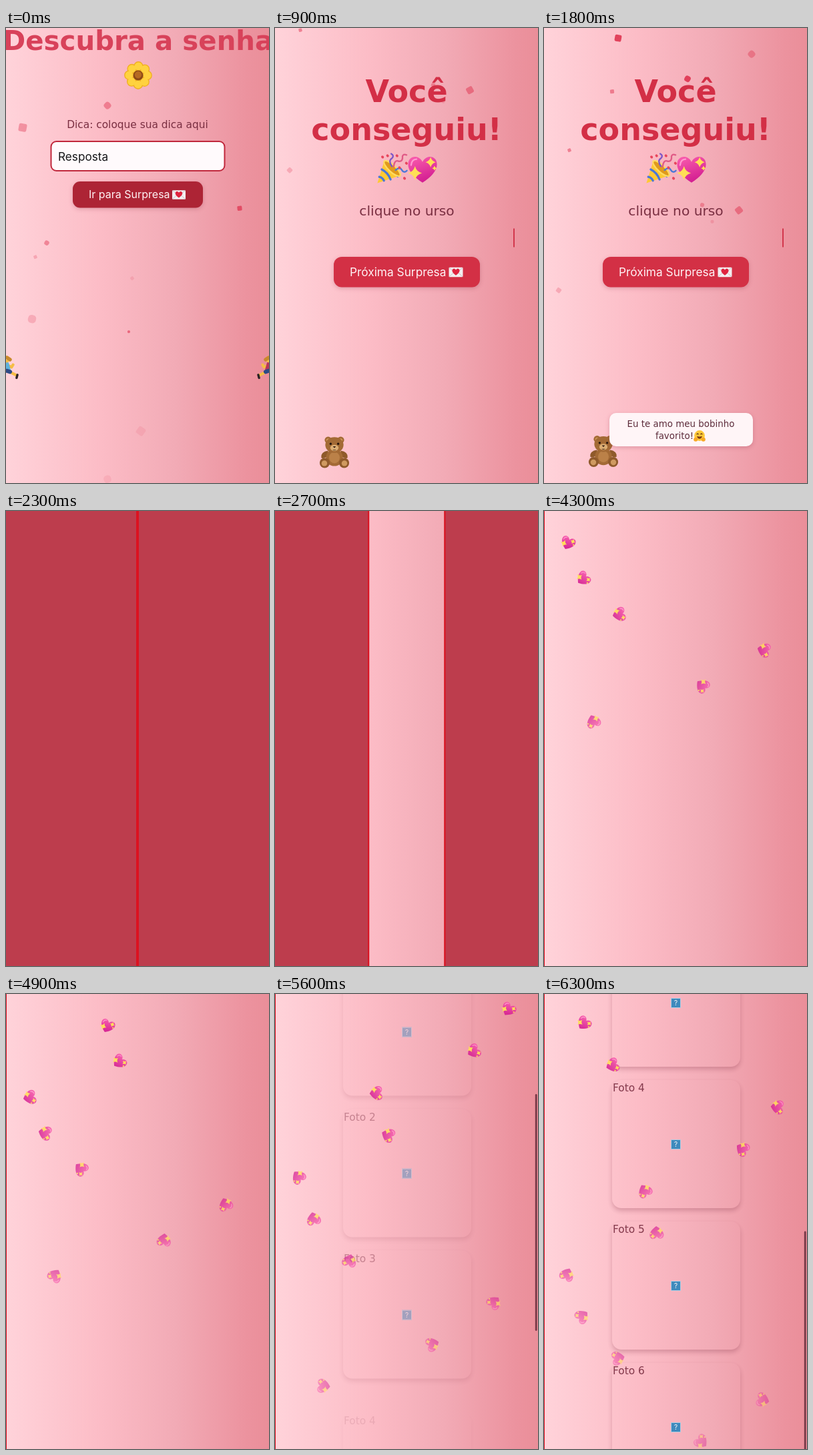
Write an HTML page that moves like this. It is 394x682 px and loops after 6400 ms.

```html
<!DOCTYPE html>
<html lang="pt">
<head>
<meta charset="utf-8">
<style>
html, body { margin: 0; width: 100%; height: 100%; overflow: hidden; }
body {
  position: relative; width: 394px; height: 682px; color: #7a2f42;
  font: 15.4px "DejaVu Sans", Verdana, sans-serif;
  background: linear-gradient(90deg, #ffd3da, #fcbcc6 36%, #f2abb6 64%, #ec939f 91%, #ea8e99);
}
svg { position: absolute; left: 0; top: 0; }
text { text-anchor: middle; fill: #7a2f42; }
.title { font-weight: bold; fill: #d32f46; }
.ui { font-family: Inter, Roboto, sans-serif; fill: #fff3f5; text-anchor: start; }
.soft { filter: drop-shadow(0 2px 3px rgba(120, 20, 40, .22)); }
.card {
  position: absolute; left: 102px; top: 0; width: 192px; height: 192px; border-radius: 14px;
  box-shadow: 0 4px 7px rgba(110, 30, 50, .27);
}
.card span { position: absolute; left: 1px; top: 3px; }
.card b {
  position: absolute; left: 88px; top: 89px; width: 13px; height: 13px; border: 1px solid #a9cfe6;
  background: #2f87bd; color: #fff; font: 10px/13px Inter, sans-serif; text-align: center;
}
</style>
</head>
<body>
<div id="photos"></div>
<svg id="stage" width="394" height="682" viewBox="0 0 394 682">
  <defs>
    <linearGradient id="pink" x1="0" y1="0" x2=".4" y2="1">
      <stop offset="0" stop-color="#fb5fae"/><stop offset="1" stop-color="#d41f92"/>
    </linearGradient>
    <path id="star" fill="#ffdf55" d="M0-20Q4-4 20 0Q4 4 0 20Q-4 4-20 0Q-4-4 0-20"/>
    <path id="love" d="M0 44C-28 26-48 5-48-16C-48-48-12-50 0-25C12-50 48-48 48-16C48 5 28 26 0 44"/>
    <g id="heart">
      <use href="#love" fill="url(#pink)"/>
      <path d="M-38-14Q-36-34-20-34" fill="none" stroke="#ff9ad0" stroke-width="5" stroke-linecap="round"/>
      <use href="#star" transform="translate(-25 12) scale(1.15)"/>
      <use href="#star" transform="translate(27 -24) scale(.85)"/>
      <use href="#star" transform="translate(40 -4) scale(.4)"/>
    </g>
    <g id="flower">
      <circle r="31" fill="#eda920" stroke="#f0ae22" stroke-width="33" stroke-linecap="round" stroke-dasharray="0 24.35"/>
      <circle r="31" fill="none" stroke="#ffd23f" stroke-width="27" stroke-linecap="round" stroke-dasharray="0 24.35"/>
      <circle r="17" fill="#8c4a17"/><circle r="12" cy="-2" fill="#b56a22"/>
    </g>
    <g id="letter">
      <rect x="-50" y="-34" width="100" height="68" rx="6" fill="#f4eef0"/>
      <path d="M-48 32L-12 0M48 32L12 0M-48-32L0 8L48-32" fill="none" stroke="#c5b9c0" stroke-width="4"/>
      <use href="#love" fill="#e0243f" transform="translate(0 -2) scale(.55)"/>
    </g>
    <g id="party" fill="none" stroke-width="5" stroke-linecap="round">
      <path d="M-46 46L-24-24Q4-14 26 22Z" fill="#ffc933"/>
      <path d="M-32 2Q-12 12-4 34M-40 26Q-30 28-25 38M-22-16Q8-4 19 24" stroke="#4a78d8" stroke-width="7"/>
      <ellipse rx="34" ry="11" transform="translate(1 -1) rotate(43)" fill="#e09a1c" stroke="#ffdb62"/>
      <path d="M0-8Q-12-26 0-33Q9-42-2-48" stroke="#7d58c8"/>
      <path d="M6-6Q8-30 22-24Q36-22 34-40Q36-48 47-44" stroke="#e05a86"/>
      <path d="M12 4Q26-8 32 4Q38 15 48 6" stroke="#4a78d8"/>
      <path d="M-30-38l1 1M-14-42l1 1M16-42l1 1M46-18l1 1M40 30l1 1M24-4l1 1" stroke="#e8455c" stroke-width="8"/>
    </g>
    <g id="bear" fill="#a36a35">
      <circle cx="-20" cy="-38" r="11"/><circle cx="20" cy="-38" r="11"/>
      <g fill="#d19a5c"><circle cx="-20" cy="-37" r="6"/><circle cx="20" cy="-37" r="6"/></g>
      <path d="M-20-4Q-44 0-42 18Q-38 24-20 14M20-4Q44 0 42 18Q38 24 20 14" fill="#8f5a2b"/>
      <ellipse cy="18" rx="27" ry="27"/><ellipse cy="18" rx="17" ry="18" fill="#bb8148"/>
      <ellipse cy="-22" rx="29" ry="25"/>
      <ellipse cy="-13" rx="13" ry="10" fill="#dcae74"/>
      <path d="M-5-18H5L0-12ZM-6-7Q0-3 6-7" fill="#3a2114"/>
      <g fill="#24140c"><circle cx="-12" cy="-26" r="3.5"/><circle cx="12" cy="-26" r="3.5"/></g>
      <circle cx="-31" cy="35" r="16" fill="#8f5a2b"/><circle cx="31" cy="35" r="16" fill="#8f5a2b"/>
      <circle cx="-32" cy="36" r="9" fill="#cf9a60"/><circle cx="32" cy="36" r="9" fill="#cf9a60"/>
    </g>
    <g id="hug">
      <circle r="44" fill="#ffc83a"/>
      <path d="M-22 4Q0 12 22 4Q16 26 0 26Q-16 26-22 4" fill="#7a3a14"/>
      <path d="M-24-10q8-12 16 0M8-10q8-12 16 0" fill="none" stroke="#5c3010" stroke-width="6"/>
      <g fill="#f7a825"><circle cx="-32" cy="32" r="17"/><circle cx="32" cy="32" r="17"/></g>
    </g>
    <g id="runner" fill="none" stroke="#f5bd45" stroke-width="11" stroke-linecap="round" stroke-linejoin="round">
      <path d="M4 10L-18 18L-12 42M6 10L26 20L42 28M2-14L22-4L28-14"/>
      <path d="M0-16L6 6" stroke="currentColor" stroke-width="24"/>
      <path d="M4 10L16 14" stroke="#2c4a86" stroke-width="16"/>
      <circle cx="2" cy="-36" r="8"/><path d="M4-42L16-34" stroke="#c98a2c" stroke-width="14"/>
      <path d="M45 26L42 38M-14 44L-24 44" stroke="#2a2024" stroke-width="9"/>
    </g>
  </defs>

  <g id="password">
    <g id="confettiA"></g>
    <text class="title" x="198" y="33" font-size="40.3" style="fill:#d8425a">Descubra a senha</text>
    <use href="#flower" transform="translate(198 71) scale(.44)"/>
    <text x="197" y="150">Dica: coloque sua dica aqui</text>
    <rect x="67.5" y="170" width="260" height="44" rx="8" fill="#fffafc" stroke="#c0283c" stroke-width="2"/>
    <text class="ui" x="78" y="199" font-size="17.2" style="fill:#17171a">Resposta</text>
    <rect class="soft" x="100" y="230" width="195" height="39.5" rx="11" fill="#ad2435"/>
    <text class="ui" x="124" y="255" font-size="16">Ir para Surpresa</text>
    <use href="#letter" transform="translate(259 250) scale(.2)"/>
    <use id="runLeft" href="#runner" color="#5db2dc"/>
    <use id="runRight" href="#runner" color="#b8365a"/>
  </g>

  <g id="success">
    <g id="confettiB"></g>
    <text class="title" font-size="46"><tspan x="197" y="111">Você</tspan><tspan x="197" y="168">conseguiu!</tspan></text>
    <use href="#party" transform="translate(175 211) scale(.47)"/>
    <use href="#heart" transform="translate(221 212) scale(.45)"/>
    <text x="197.5" y="281" font-size="20.2">clique no urso</text>
    <path id="caret" d="M358 300.5V328.5" stroke="#d2364c" stroke-width="2"/>
    <rect class="soft" x="88" y="343" width="219" height="45.5" rx="12" fill="#d33045"/>
    <text class="ui" x="112" y="372" font-size="17.3">Próxima Surpresa</text>
    <use href="#letter" transform="translate(271 366) scale(.21)"/>
    <use id="teddy" href="#bear"/>
    <g id="bubble">
      <rect class="soft" x="98" y="577" width="215" height="50" rx="10" fill="#fff5f7"/>
      <text font-size="13.4" style="fill:#5c2b3a"><tspan x="205" y="598">Eu te amo meu bobinho</tspan><tspan x="195.5" y="616">favorito!</tspan></text>
      <use href="#hug" transform="translate(233 611) scale(.18)"/>
    </g>
  </g>

  <g id="surprise">
    <g id="rain"></g>
    <g id="curtainL"><rect x="-200" width="200" height="682" fill="#bd3d4d"/><rect x="-2" width="2" height="682" fill="#dc1220"/></g>
    <g id="curtainR"><rect width="200" height="682" fill="#bd3d4d"/><rect width="2" height="682" fill="#dc1220"/></g>
    <rect id="thumb" x="389.8" width="2.8" height="355" rx="1.4" fill="#5a2433" opacity=".8"/>
  </g>
</svg>
<script>
const LOOP = 6400, SUCCESS = 400, CURTAIN = 2200, OPEN = 2310, SCROLL = 5300;
const $ = id => document.getElementById(id);
const clamp = v => Math.max(0, Math.min(1, v));
const mix = (a, b, k) => a + (b - a) * k;

// CSS "ease" timing curve
function ease(u) {
  if (u <= 0 || u >= 1) return clamp(u);
  let lo = 0, hi = 1, s;
  for (let i = 0; i < 20; i++) {
    s = (lo + hi) / 2;
    if (.75 * s * (1 - s) + s ** 3 < u) lo = s; else hi = s;
  }
  return .3 * s * (1 - s) ** 2 + 3 * s * s * (1 - s) + s ** 3;
}

function add(parent, tag, attrs) {
  const el = document.createElementNS("http://www.w3.org/2000/svg", tag);
  for (const name in attrs) el.setAttribute(name, attrs[name]);
  return parent.appendChild(el);
}

function place(el, x, y, scale = 1, turn = 0) {
  el.setAttribute("transform", `translate(${x} ${y}) rotate(${turn}) scale(${scale})`);
}

// Each piece: x, y at the given time, size, opacity
function confetti(parent, time, pieces) {
  const items = pieces.map(([x, y, size, opacity], i) => ({
    x, y, i,
    el: add(parent, "rect", { x: -size / 2, y: -size / 2, width: size, height: size,
      rx: size * (i % 2 ? .4 : .22), fill: "#df3450", opacity })
  }));
  return t => items.forEach(({ el, x, y, i }) =>
    place(el, x, y + (t - time) * .2, 1, 10 + i * 37 + (t - time) * .09));
}

const fallA = confetti($("confettiA"), 0, [
  [25, 149, 12, .4], [152, 116, 10, .45], [350, 270, 7, .75], [61, 322, 7, .45], [44, 343, 5, .25],
  [39, 436, 12, .22], [189, 375, 5, .14], [184, 455, 4, .6], [202, 604, 12, .1], [152, 676, 11, .1]
]);
const fallB = confetti($("confettiB"), 1800, [
  [111, 15, 10, .9], [311, 39, 10, .4], [102, 95, 6, .5], [215, 76, 9, .9], [38, 183, 5, .5],
  [237, 265, 6, .4], [292, 273, 10, .5], [252, 290, 5, .2], [22, 393, 7, .25], [180, -40, 8, .7]
]);

const hearts = [75, 238, 330, 113, 59, 36, 170, 152, 298, 350, 103, 60].map((x, i) =>
  ({ x, born: 2536 + i * 300, el: add($("rain"), "use", { href: "#heart" }) }));

const cards = [1, 2, 3, 4, 5, 6].map(n => {
  const el = document.createElement("div");
  el.className = "card";
  el.innerHTML = `<span>Foto ${n}</span><b>?</b>`;
  return $("photos").appendChild(el);
});

function drawPassword(t) {
  fallA(t);
  place($("runLeft"), -t * .04, 510, .38);
  $("runRight").setAttribute("transform", `translate(${395 + t * .04} 510) scale(-.38 .38)`);
}

function drawSuccess(t) {
  fallB(t);
  $("caret").style.opacity = t % 750 < 375 ? 1 : 0;
  place($("teddy"), 89, 634 + 1.5 * Math.sin((t - 1800) / 200), .47);
  $("bubble").style.opacity = clamp((t - 1100) / 300);
}

function drawSurprise(t) {
  const open = ease((t - OPEN) / 2000);
  place($("curtainL"), 197 - 196 * open, 0);
  place($("curtainR"), 197 + 198 * open, 0);

  // The viewport grows once scrolling begins, so hearts fall farther per second
  const grow = clamp((t - SCROLL + 50) / 250);
  for (const { el, x, born } of hearts) {
    const age = t - born;
    el.style.display = age > 0 ? "" : "none";
    place(el, x - age / 1500, mix(1, -53, grow) + mix(.178, .209, grow) * age, .22, age * .09);
    el.style.opacity = 1 - .68 * clamp(age / 4000);
  }

  const scroll = 714 * (1 - (1 - clamp((t - SCROLL) / 1000)) ** 1.53);
  cards.forEach((el, i) => {
    const shown = ease((t - (i < 3 ? 5385 : 5500)) / 800);
    el.style.opacity = shown * .92;
    el.style.transform = `translateY(${207 + i * 212 - scroll + 100 * (1 - shown)}px)`;
  });
  $("thumb").setAttribute("y", scroll * .498);
  $("thumb").style.display = t >= SCROLL ? "" : "none";
}

const scenes = [
  { ids: ["password"], from: 0, to: SUCCESS, draw: drawPassword },
  { ids: ["success"], from: SUCCESS, to: CURTAIN, draw: drawSuccess },
  { ids: ["surprise", "photos"], from: CURTAIN, to: LOOP, draw: drawSurprise }
];

const start = performance.now();
function tick() {
  const t = (performance.now() - start) % LOOP;
  for (const { ids, from, to, draw } of scenes) {
    const active = t >= from && t < to;
    ids.forEach(id => $(id).style.display = active ? "" : "none");
    if (active) draw(t);
  }
  requestAnimationFrame(tick);
}
tick();
</script>
</body>
</html>
```
